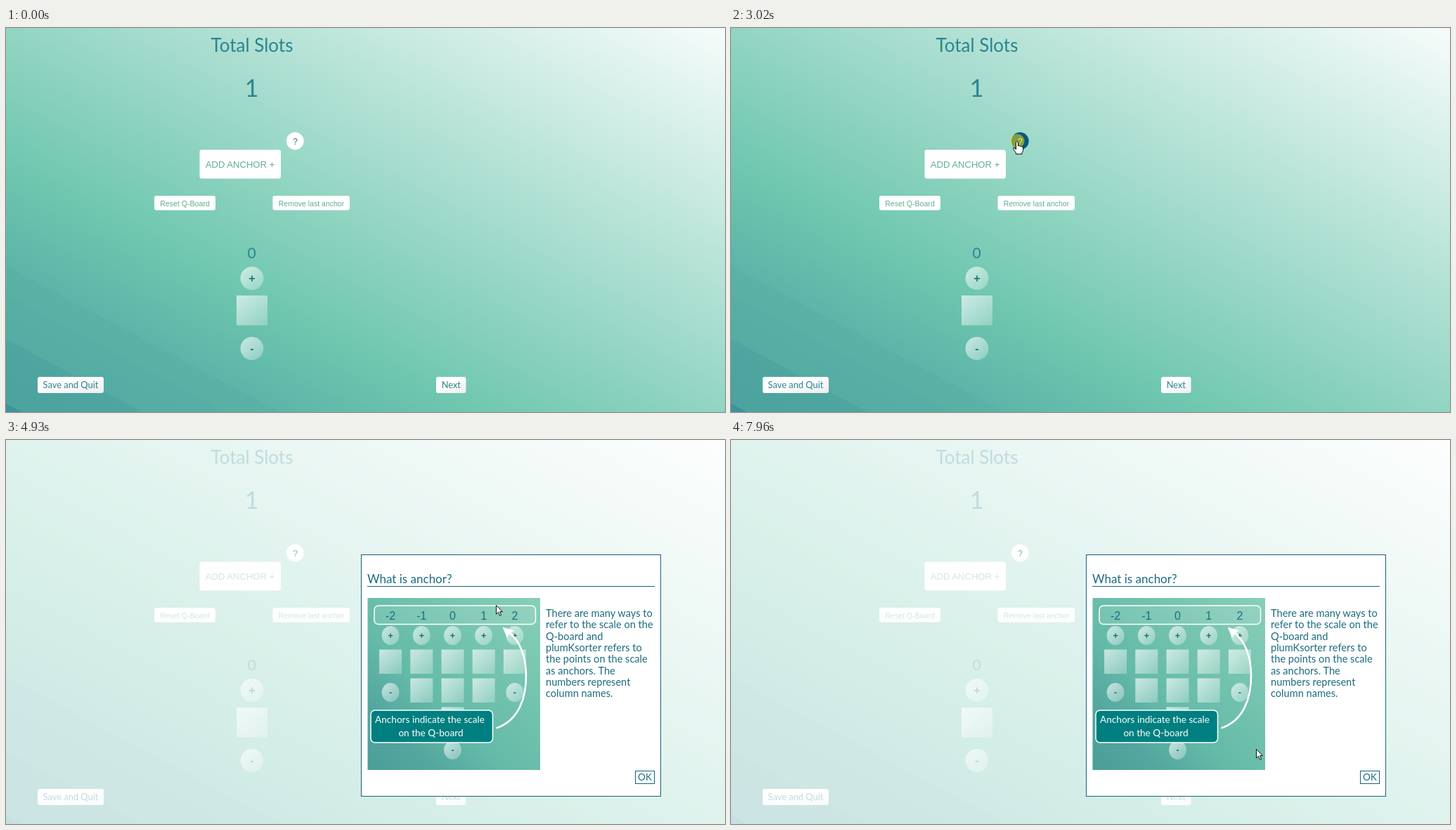
Animation of 1023x547 px, one loop 8000 ms. Source, as an HTML page:

```html
<!DOCTYPE html>
<html lang="en">
<head>
<meta charset="utf-8">
<title>Anchor help</title>
<style>
  html, body { margin: 0; width: 100%; height: 100%; overflow: hidden; background: #fff; }
  svg { display: block; width: 100vw; height: 100vh; }
  text { font-family: Lato, "Open Sans", sans-serif; fill: #2b858e; }
  .mid { text-anchor: middle; }
  .ui { font-family: "Liberation Sans", Arial, sans-serif; fill: #5fae93; }
  .sign { font-family: "Liberation Sans", Arial, sans-serif; font-weight: bold; fill: #237a7e; }
  .scale { font-family: "Liberation Sans", Arial, sans-serif; font-size: 16px; fill: #0e5a70; }
  .note text { fill: #1c6c7f; }
  .callout text { fill: #fff; font-size: 13.6px; }
  .line { fill: none; stroke: #17607c; }
  .pointer { fill: #fff; stroke: #111; stroke-linejoin: round; }
</style>
</head>
<body>
<svg viewBox="0 0 1023 547">
  <defs>
    <linearGradient id="sky" x1="0" y1="1" x2="1" y2="0">
      <stop offset=".011" stop-color="#3c929e"/>
      <stop offset=".011" stop-color="#4ca39e"/>
      <stop offset=".095" stop-color="#4fa6a0"/>
      <stop offset=".095" stop-color="#54aca3"/>
      <stop offset=".153" stop-color="#56aea4"/>
      <stop offset=".153" stop-color="#59b1a6"/>
      <stop offset=".19" stop-color="#5ab2a6"/>
      <stop offset=".19" stop-color="#5cb5a8"/>
      <stop offset=".325" stop-color="#6fc7af"/>
      <stop offset="1" stop-color="#f7fcfb"/>
    </linearGradient>
    <linearGradient id="board" x1="0" y1="1" x2="1" y2="0">
      <stop offset="0" stop-color="#4b9d99"/>
      <stop offset=".2" stop-color="#54a79e"/>
      <stop offset=".4" stop-color="#64baa8"/>
      <stop offset=".6" stop-color="#6fc1ac"/>
      <stop offset="1" stop-color="#88cfb9"/>
    </linearGradient>
    <linearGradient id="glass" x1="0" y1="0" x2="1" y2="1">
      <stop offset="0" stop-color="#fff" stop-opacity=".66"/>
      <stop offset="1" stop-color="#fff" stop-opacity=".25"/>
    </linearGradient>
    <linearGradient id="key" x1="0" y1="0" x2="1" y2="1">
      <stop offset=".4" stop-color="#fff"/>
      <stop offset="1" stop-color="#ededed"/>
    </linearGradient>
  </defs>

  <rect width="1023" height="547" fill="url(#sky)"/>
  <text class="mid" x="350" y="34" font-size="26">Total Slots</text>
  <text class="mid" x="349.5" y="98" font-size="34">1</text>

  <g fill="#fff">
    <rect x="275.5" y="173.5" width="115.5" height="41" rx="3"/>
    <rect x="211" y="239" width="87" height="20.5" rx="3"/>
    <rect x="379.5" y="239" width="109.5" height="20.5" rx="3"/>
  </g>
  <text class="ui mid" x="333" y="199" font-size="13.1">ADD ANCHOR +</text>
  <text class="ui mid" x="254.5" y="253.5" font-size="10.6">Reset Q-Board</text>
  <text class="ui mid" x="434.5" y="253.5" font-size="10.5">Remove last anchor</text>

  <text class="mid" x="349.5" y="328" font-size="21">0</text>
  <g fill="url(#glass)">
    <circle cx="350" cy="356.5" r="16.5"/>
    <rect x="328" y="381" width="44" height="42.5"/>
    <circle cx="350" cy="456.5" r="16.5"/>
  </g>
  <text class="sign mid" x="350" y="362" font-size="16">+</text>
  <text class="sign mid" x="350" y="462" font-size="16">-</text>

  <g fill="url(#key)">
    <rect x="45" y="497" width="94" height="23" rx="3"/>
    <rect x="612" y="497" width="42.5" height="23" rx="3"/>
  </g>
  <text class="mid" x="92" y="513" font-size="12.9">Save and Quit</text>
  <text class="mid" x="633.3" y="513" font-size="12.8">Next</text>

  <circle id="help" cx="411.3" cy="161" r="12.4"/>
  <text id="mark" class="ui mid" x="411.5" y="165.5" font-size="12">?</text>

  <g id="tip">
    <rect x="402.5" y="178.5" width="75" height="17" fill="#fff" stroke="#888"/>
    <text class="mid" x="440" y="190.3" font-size="9.5" style="fill:#555">What is anchor?</text>
  </g>
  <circle id="click" cx="407.5" cy="161" r="10" fill="#ffe600" opacity=".5"/>

  <g id="modal" class="note">
    <rect width="1023" height="547" fill="#fff" opacity=".71"/>
    <text id="clear" class="ui mid" x="411.5" y="165.5" font-size="12" style="fill:#7fb5aa">?</text>
    <rect x="505.5" y="163.5" width="426" height="344" class="line" style="fill:#fff"/>
    <text x="514" y="203.5" font-size="17">What is anchor?</text>
    <path class="line" d="M514 208.5H923"/>
    <rect x="514.5" y="225" width="245.5" height="245" fill="url(#board)"/>
    <rect x="524" y="236" width="229.5" height="26.5" rx="6" fill="#fff" fill-opacity=".1" stroke="#fff" stroke-width="1.5"/>
    <g id="grid"></g>
    <path d="M698.5 410C728 400 741 369 740 332C739 306 730 286 716 274" fill="none" stroke="#fff" stroke-width="2.6" stroke-linecap="round"/>
    <path d="M706.5 266.5L723 271.5L717 275L713 282Z" fill="#fff"/>
    <g class="callout">
      <rect x="519" y="385" width="173.5" height="46" rx="6" fill="#007f80" stroke="#fff" stroke-width="1.5"/>
      <text class="mid" x="603" y="402.5">Anchors indicate the scale</text>
      <text class="mid" x="604.5" y="422">on the Q-board</text>
    </g>
    <g id="words" font-size="14.6"></g>
    <rect class="line" x="895.5" y="471.5" width="27" height="18"/>
    <text class="mid" x="909" y="485.3" font-size="13.5">OK</text>
  </g>

  <g id="cursor">
    <path id="arrow" class="pointer" d="M.5 .5V13L3.4 10.3L5.5 15.2L7.6 14.3L5.5 9.6H9.4Z"/>
    <path id="hand" class="pointer" d="M-1.5 1.8Q0 -.6 1.5 1.8V7Q3 5.6 4 7.4Q5.6 6.4 6.4 8.1Q8.5 7.5 8.6 10V13.5Q8.5 15 7 16.5V18.6H-1.5V17L-5.3 11.5Q-6 9.3 -4 9.8L-1.5 12Z"/>
    <path id="beam" fill="none" stroke="#222" d="M-3 -6H3M-3 6H3M0 -6V6"/>
  </g>
</svg>

<script>
const LOOP = 8000, STEP = 65, STEPS = 13;
const $ = id => document.getElementById(id);
const show = (id, on) => $(id).setAttribute('visibility', on ? 'inherit' : 'hidden');

function add(parent, tag, attrs, text = '') {
  const el = document.createElementNS('http://www.w3.org/2000/svg', tag);
  for (const name in attrs) el.setAttribute(name, attrs[name]);
  el.textContent = text;
  $(parent).append(el);
}

// Small board inside the dialog
const slot = (x, y) => add('grid', 'rect', { x: x - 16, y, width: 32, height: 34.5, fill: 'url(#glass)' });
function knob(x, y, sign) {
  add('grid', 'ellipse', { cx: x, cy: y, rx: 12.4, ry: 13.4, fill: 'url(#glass)' });
  add('grid', 'text', { x, y: y + 4.3, class: 'sign mid', 'font-size': 12.5 }, sign);
}
for (let i = -2; i <= 2; i++) {
  const x = 635.5 + i * 44.2;
  add('grid', 'text', { x, y: 255.5, class: 'scale mid' }, i);
  knob(x, 278.5, '+');
  slot(x, 298.5);
  if (Math.abs(i) < 2) slot(x, 339.5);
  else knob(x, 359.5, '-');
}
slot(635.5, 380.5);
knob(635.5, 441.5, '-');

['There are many ways to', 'refer to the scale on the', 'Q-board and', 'plumKsorter refers to',
  'the points on the scale', 'as anchors. The', 'numbers represent', 'column names.']
  .forEach((line, i) => add('words', 'text', { x: 768, y: 252 + i * 16.35 }, line));

// Pointer moves: start time, then start, control and end point
const moves = [
  [400, [1071, 690], [641, 142], [403, 164]],
  [4070, [407, 161], [539, 195.5], [671, 230]],
  [4930, [671, 230], [758.5, 248.5], [846, 267]],
  [5790, [846, 267], [924, 281], [857, 296]],
  [6650, [857, 296], [833, 288], [711, 376]],
  [7500, [711, 376], [677, 417], [772.6, 450]]
];

function pointerAt(t) {
  if (t >= 1250 && t < 4070) return [t >= 2110 && t < 2170 ? 403 : 407, 161];
  const [start, a, b, c] = moves.filter(m => m[0] <= t).pop() || moves[0];
  const k = Math.min(STEPS, Math.floor((t - start) / STEP) + 1);
  const u = 1 - (1 - k / STEPS) ** 2, v = 1 - u;
  return a.map((p, i) => v * v * p + 2 * u * v * b[i] + u * u * c[i]);
}

function draw(t) {
  const [x, y] = pointerAt(t);
  const open = t >= 3150;
  const hover = t >= 1050 && !open;
  const typing = open && x > 766 && y > 240;

  $('help').setAttribute('fill', hover ? '#05597f' : '#fff');
  $('mark').style.fill = hover ? '#fff' : '#2a7f80';
  show('mark', t < 4070);
  show('tip', t >= 1780 && t < 3020);
  show('click', t >= 3020 && !open);
  show('modal', open);
  show('clear', t >= 4070);

  $('cursor').setAttribute('transform', `translate(${Math.round(x)} ${Math.round(y)})`);
  show('cursor', t >= 400);
  show('hand', hover);
  show('beam', typing);
  show('arrow', !hover && !typing);
}

let began;
function tick(now) {
  began ??= now;
  draw((now - began) % LOOP);
  requestAnimationFrame(tick);
}
draw(0);
requestAnimationFrame(tick);
</script>
</body>
</html>
```
